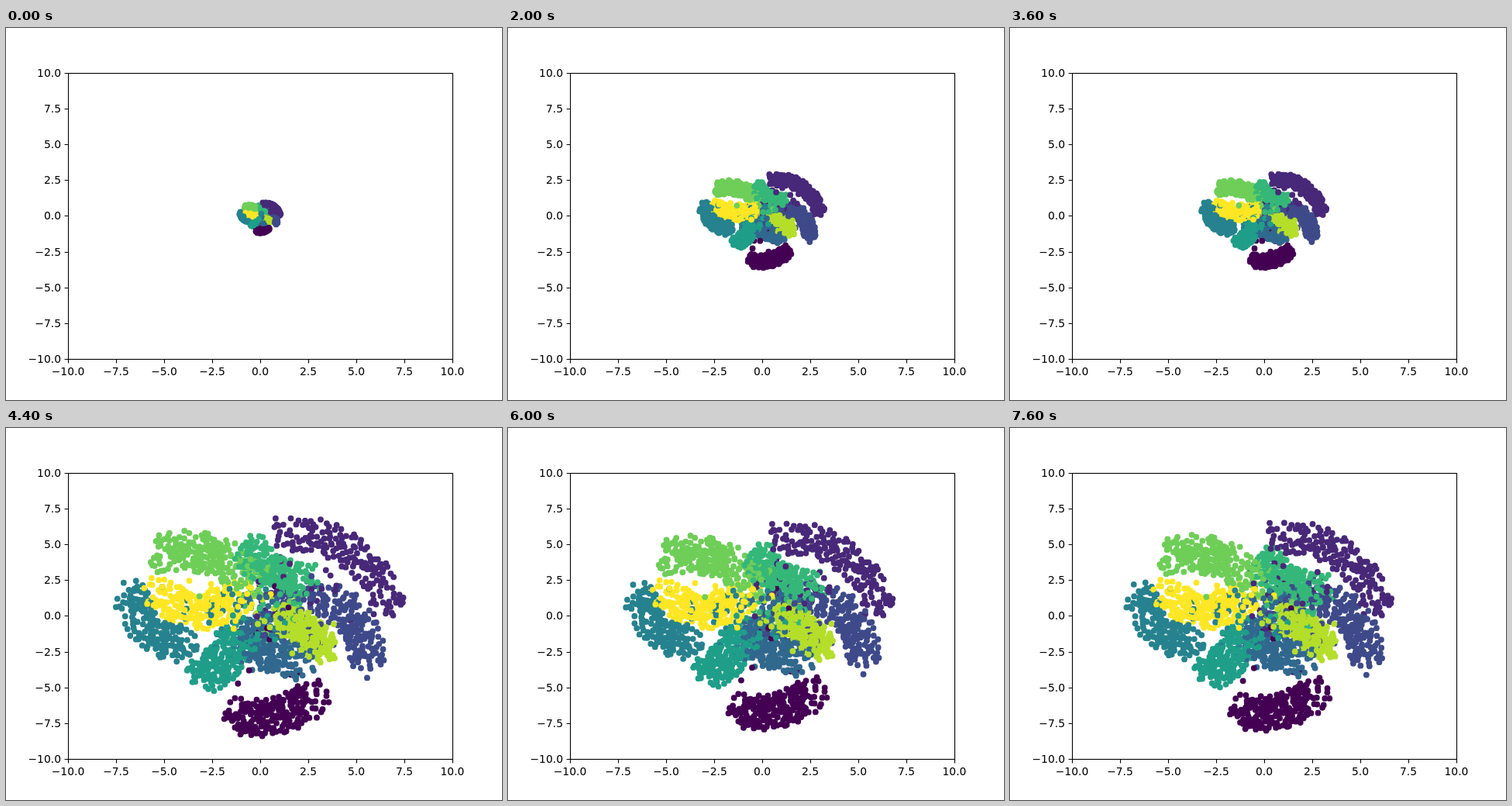
Animation, 640 px wide and 480 px high, one loop 8000 ms. Source, as an HTML page with a canvas:

```html
<!DOCTYPE html>
<html lang="en">
<head>
<meta charset="utf-8">
<title>Scatter embedding</title>
<style>
html, body { margin: 0; width: 100%; height: 100%; overflow: hidden; background: #fff; }
canvas, svg { position: absolute; left: 0; top: 0; width: 640px; height: 480px; }
text { font: 13.89px "DejaVu Sans", sans-serif; }
</style>
</head>
<body>
<canvas id="plot" width="640" height="480"></canvas>
<svg id="axes" viewBox="0 0 640 480" fill="none" stroke="#000" stroke-width="1.1"></svg>
<script>
const STEP = 400, FRAMES = 20, RELEASE = 9;
const PER_GROUP = 210, RADIUS = 3.9;
const MID = { x: 328, y: 243 }, HUB = { x: 342, y: 235 };

// Each group is a bent band: start, bend, end, half width, share of strays, late drift
const groups = [
  { color: '#440154', band: [298, 370, 355, 384, 400, 344], half: 25, strays: .05 },
  { color: '#482878', band: [352, 138, 458, 128, 493, 228], half: 23, strays: .1, drift: [-12, 0] },
  { color: '#3e4a89', band: [412, 222, 458, 235, 465, 300], half: 26, strays: .25 },
  { color: '#31688e', band: [315, 262, 340, 300, 380, 300], half: 26, strays: .35 },
  { color: '#26828e', band: [161, 217, 172, 266, 227, 281], half: 24, strays: .17 },
  { color: '#1f9e89', band: [258, 318, 285, 300, 308, 268], half: 26, strays: .08 },
  { color: '#35b779', band: [317, 158, 330, 192, 388, 195], half: 24, strays: .06, drift: [15, 10] },
  { color: '#6ece58', band: [202, 165, 255, 146, 305, 188], half: 27, strays: .06 },
  { color: '#b5de2b', band: [352, 248, 388, 248, 408, 288], half: 22, strays: .1 },
  { color: '#fde725', band: [198, 212, 240, 260, 302, 216], half: 25, strays: .06 }
];

let state = 20240;
function rand() {
  state = (state + 0x6D2B79F5) | 0;
  let r = Math.imul(state ^ (state >>> 15), 1 | state);
  r = (r + Math.imul(r ^ (r >>> 7), 61 | r)) ^ r;
  return ((r ^ (r >>> 14)) >>> 0) / 4294967296;
}

const lerp = (a, b, m) => a + (b - a) * m;
const bend = (a, b, c, t) => lerp(lerp(a, b, t), lerp(b, c, t), t);

// A dot has an anchor on the band and an offset from it
function pick(group) {
  const [ax, ay, bx, by, cx, cy] = group.band, t = rand();
  const stray = rand() < group.strays, pull = stray ? rand() : 0;
  const angle = rand() * Math.PI * 2;
  const reach = Math.sqrt(rand()) * group.half * (stray ? 1.7 : 1);
  return {
    group,
    x: lerp(bend(ax, bx, cx, t), HUB.x, pull),
    y: lerp(bend(ay, by, cy, t), HUB.y, pull),
    dx: Math.cos(angle) * reach,
    dy: Math.sin(angle) * reach,
    order: rand()
  };
}

const gap = (p, q) => Math.hypot(p.x + p.dx - q.x - q.dx, p.y + p.dy - q.y - q.dy);

// Of two tries, keep the one farther from its neighbours
function fill(group) {
  const dots = [];
  const room = p => Math.min(...dots.map(q => gap(p, q)));
  while (dots.length < PER_GROUP) {
    const a = pick(group), b = pick(group);
    dots.push(room(a) > room(b) ? a : b);
  }
  return dots;
}

const dots = groups.flatMap(fill).sort((a, b) => a.order - b.order);

// The cloud swings out to a packed size, then is released to a larger one
const spring = n => Math.exp(-.65 * n) * Math.cos(.95 * n);
const size = n => n < RELEASE
  ? .445 - .295 * spring(n)
  : .955 - .51 * spring(n - RELEASE);

const ctx = document.getElementById('plot').getContext('2d');

function draw(frame) {
  const scale = size(frame), loose = scale ** 1.3;
  const late = Math.max(0, (frame - RELEASE - 2) / 8);
  ctx.clearRect(0, 0, 640, 480);
  for (const { group, x, y, dx, dy } of dots) {
    const [sx, sy] = group.drift || [0, 0];
    ctx.fillStyle = group.color;
    ctx.beginPath();
    ctx.arc(MID.x + (x - MID.x) * scale + dx * loose + sx * late,
            MID.y + (y - MID.y) * scale + dy * loose + sy * late,
            RADIUS, 0, Math.PI * 2);
    ctx.fill();
  }
}

function drawAxes() {
  const label = v => v.toFixed(1).replace('-', '\u2212');
  const text = (x, y, anchor, s) =>
    `<text x="${x}" y="${y}" text-anchor="${anchor}" fill="#000" stroke="none">${s}</text>`;
  let out = '<rect x="80.5" y="58.5" width="496" height="369"/>';
  for (let i = 0; i <= 8; i++) {
    const v = -10 + 2.5 * i, x = 80 + 62 * i, y = 427.2 - 46.2 * i;
    out += `<path d="M${x + .5} 427.5v4.9M80.5 ${Math.round(y) + .5}h-4.9"/>`;
    out += text(x, 448, 'middle', label(v)) + text(71, Math.round(y + 5.1), 'end', label(v));
  }
  document.getElementById('axes').innerHTML = out;
}

drawAxes();
draw(0);
const start = performance.now();
let shown = 0;
function tick() {
  const frame = Math.floor((performance.now() - start) / STEP) % FRAMES;
  if (frame !== shown) draw(shown = frame);
  requestAnimationFrame(tick);
}
requestAnimationFrame(tick);
</script>
</body>
</html>
```
